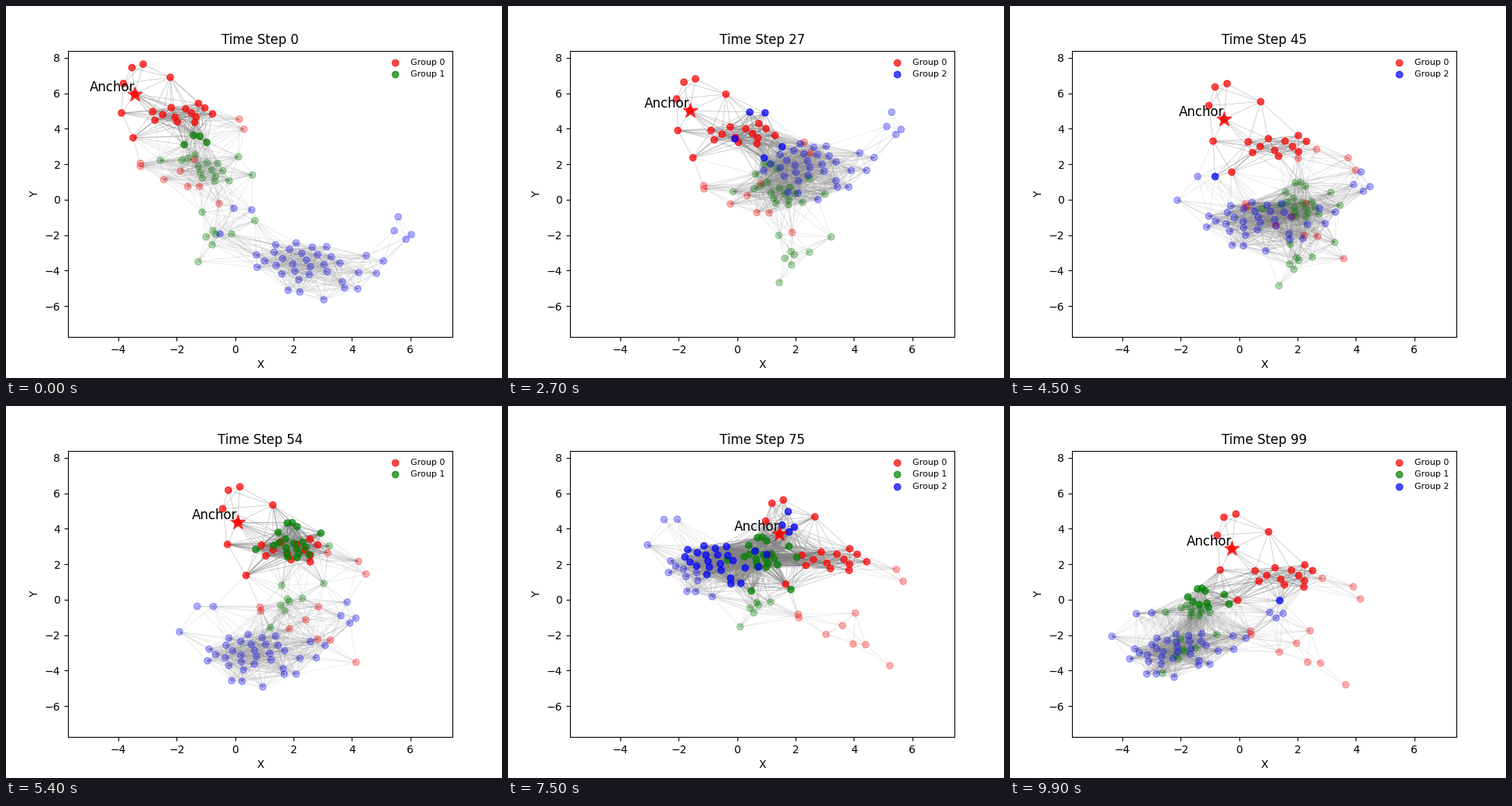
Write a matplotlib script that moves like this. It is 640x480 px and loops after 10000 ms.

```python
import numpy as np
import matplotlib.pyplot as plt
from matplotlib.animation import FuncAnimation
from matplotlib.collections import LineCollection
from matplotlib.colors import to_rgba

FRAMES, INTERVAL = 100, 100
LINK_RADIUS = 2.35
BRIGHT, FADED = 0.7, 0.3
ORIGIN = np.array([295.8, 249.8])
UNIT = np.array([37.67, -22.87])
KEYS = [0, 12, 27, 45, 63, 86, 99]
REACH = [3.8, 3.8, 3.86, 3.32, 3.45, 3.7, 3.4]


def to_data(px):
    return (np.asarray(px) - ORIGIN) / UNIT


def cloud(cx, cy, rx, ry, slope, n):
    """Sunflower pattern in a sheared ellipse."""
    k = np.arange(n)
    r, a = np.sqrt((k + 0.5) / n), 2.4 * k
    x = rx * r * np.cos(a)
    return np.column_stack([cx + x, cy + ry * r * np.sin(a) + slope * x])


class Group:
    """Points carried along by a triangle whose corners move."""

    def __init__(self, color, corners, points, cluster, swings):
        self.color = color
        paths = np.reshape(corners, (3, -1, 2)).astype(float)
        poses = dict(zip(KEYS, paths.swapaxes(0, 1)))
        for t, shift in swings.items():
            poses[t] = self.blend(paths, t) + shift
        self.times = np.array(sorted(poses), float)
        self.poses = np.array([poses[t] for t in sorted(poses)])
        self.slopes = np.gradient(self.poses, self.times, axis=0)

        layout = np.vstack([paths[:, 0], points, cloud(*cluster)])
        self.size = len(layout)
        triangle = np.column_stack([paths[:, 0], np.ones(3)])
        flat = np.column_stack([layout, np.ones(self.size)])
        self.weights = flat @ np.linalg.inv(triangle)

    @staticmethod
    def blend(paths, t):
        return np.array([[np.interp(t, KEYS, axis) for axis in p.T] for p in paths])

    def at(self, t):
        """Positions in data units at time step t."""
        i = min(np.searchsorted(self.times, t, side="right"), len(self.times) - 1) - 1
        h = self.times[i + 1] - self.times[i]
        u = (t - self.times[i]) / h
        v = 1 - u
        a, b = self.poses[i], self.poses[i + 1]
        da, db = self.slopes[i] * h, self.slopes[i + 1] * h
        pose = v * v * (a * (1 + 2 * u) + da * u) + u * u * (b * (1 + 2 * v) - db * v)
        return to_data(self.weights @ pose)


# Corner rows hold x, y in stage pixels for every key time.
red = Group(
    "red",
    [[166, 113.5, 199, 118.5, 234.5, 135, 276, 146, 322, 155, 325, 174, 286, 184],
     [307, 159, 349, 169, 390, 190, 446, 212, 482, 220, 484, 232, 452, 249],
     [173.5, 207, 208, 219, 253, 236, 305, 260, 351, 267, 346, 279, 311, 295]],
    [(177, 75), (162.5, 79.5), (212, 92), (151.5, 100), (149, 138), (164, 170),
     (301, 146), (173.5, 203), (203.5, 224), (225, 213), (243, 198),
     (234.5, 233), (249.5, 233), (275, 255)],
    (230, 139, 48, 14, -0.1, 13),
    {74: (27, 0)})

green = Group(
    "green",
    [[242, 167, 263, 131, 330, 204, 368, 228, 358, 130, 289, 258, 242, 236],
     [321, 277, 347, 248, 417, 298, 419, 305, 401, 209, 332, 314, 267, 295],
     [248, 330, 277, 309, 350, 357, 347, 361, 335, 266, 267, 354, 197, 345]],
    [(250, 168), (259, 176), (230, 179), (199, 199), (300, 194.5), (318, 218),
     (253.5, 222), (253, 266), (267, 290), (258, 298), (271, 295),
     (291, 294), (266, 308)],
    (258, 208, 38, 14, 0.45, 12),
    {37: (0, 50), 54: (0, -28), 75: (0, -27), 92: (0, 36)})

blue = Group(
    "blue",
    [[294, 261, 305, 207, 312, 137, 242, 220, 251, 197, 136, 197, 163, 268],
     [506, 272, 523, 210, 495, 137, 453, 214, 427, 192, 282, 182, 348, 251],
     [410, 379, 409, 335, 400, 250, 330, 316, 332, 309, 181, 285, 212, 350]],
    [(276, 294), (317, 263), (487, 329), (501, 290), (523, 295), (516, 301),
     (478, 345), (465, 322), (455, 344), (454, 365), (437, 364), (434, 356),
     (324, 337), (323, 321), (364, 367), (379, 369)],
    (380, 328, 52, 27, 0, 22),
    {3: (0, 20), 33: (-16, -20), 53: (0, 50), 76: (10, -50), 92: (-16, 6)})

groups = [red, green, blue]

fig, ax = plt.subplots(figsize=(6.4, 4.8), dpi=100)
(left, bottom), (right, top) = to_data([(80, 427.2), (576, 57.6)])
ax.set(xlim=(left, right), ylim=(bottom, top), xlabel="X", ylabel="Y",
       xticks=range(-4, 7, 2), yticks=range(-6, 9, 2))

links = LineCollection([], linewidths=0.5, zorder=1)
ax.add_collection(links, autolim=False)
dots = [ax.scatter(*np.zeros((2, g.size)), color=g.color, zorder=2) for g in groups]
star = ax.scatter([0], [0], s=200, marker="*", color="red", alpha=BRIGHT, zorder=3)
name = ax.text(0, 0, "Anchor", fontsize=12, ha="right", va="bottom")
entries = [ax.scatter([], [], color=g.color, alpha=BRIGHT, label=f"Group {i}")
           for i, g in enumerate(groups)]


def update(t):
    places = [g.at(t) for g in groups]
    anchor = places[0][0]
    reach = np.interp(t, KEYS, REACH)
    near = [np.linalg.norm(p - anchor, axis=1) < reach for p in places]

    for g, dot, pts, lit in zip(groups, dots, places, near):
        dot.set_offsets(pts)
        dot.set_color([to_rgba(g.color, BRIGHT if on else FADED) for on in lit])

    pts, lit = np.vstack(places), np.concatenate(near)
    i, j = np.triu_indices(len(pts), 1)
    close = np.linalg.norm(pts[i] - pts[j], axis=1) < LINK_RADIUS
    i, j = i[close], j[close]
    links.set_segments(np.stack([pts[i], pts[j]], axis=1))
    links.set_color([to_rgba("gray", 0.5 if on else 0.22) for on in lit[i] & lit[j]])

    star.set_offsets([anchor])
    name.set_position(anchor)
    ax.set_title(f"Time Step {t}")
    ax.legend(handles=[e for e, lit in zip(entries, near) if lit.any()],
              loc="upper right", fontsize=8, frameon=False)
    return []


anim = FuncAnimation(fig, update, frames=FRAMES, init_func=lambda: [],
                     interval=INTERVAL, repeat=True, repeat_delay=0)
plt.show()
```
